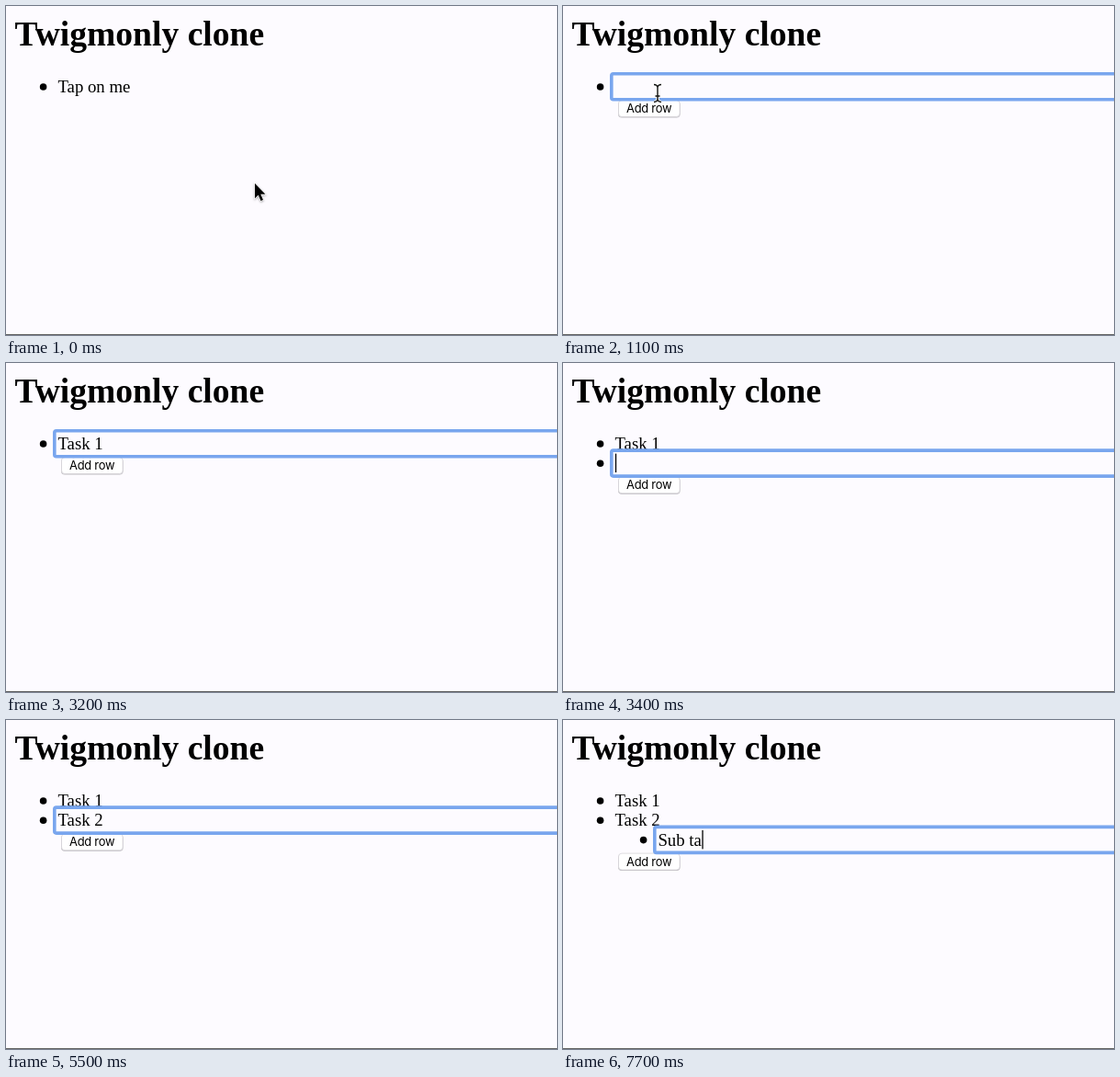
These frames come from a looping animation (600 by 358 pixels, 8000 ms). An HTML page:

```html
<!DOCTYPE html>
<html lang="en">
<head>
<meta charset="utf-8">
<title>Outline editor</title>
<style>
  html, body { margin: 0; width: 100%; height: 100%; overflow: hidden; background: #fdfbff; }
  svg { display: block; width: 600px; height: 358px; }
  text { font: 18.8px "Liberation Serif", "Times New Roman", serif; white-space: pre; }
  .title { font-size: 37.6px; font-weight: bold; }
  .label { font: 12.9px Inter, "Open Sans", sans-serif; letter-spacing: -.02em; text-anchor: middle; }
  .ring { fill: none; stroke: #79a6ee; stroke-width: 3.6; }
  .halo { fill: none; stroke: #fff; stroke-width: 3.4; }
  .beam { fill: none; stroke: #111; stroke-width: 1.4; }
  .arrow { stroke: #fff; stroke-width: 1.3; paint-order: stroke; filter: drop-shadow(0 1px 1px #0005); }
</style>
</head>
<body>
<svg viewBox="0 0 600 358">
  <defs>
    <path id="ibeam" d="M-4 -9.5Q-.5 -9.5 0 -6.5Q.5 -9.5 4 -9.5M0 -7V7M-2.5 3H2.5M-4 9.5Q-.5 9.5 0 6.5Q.5 9.5 4 9.5"/>
  </defs>
  <text class="title" x="9.4" y="42.5">Twigmonly clone</text>
  <g id="rows"></g>
  <g id="button">
    <rect x="60" y="103.4" width="67.6" height="18" rx="4" fill="#bdbbc0"/>
    <rect x="60.5" y="102.5" width="66.6" height="18" rx="3.6" fill="#fff" stroke="#d6d4d8" stroke-width=".8"/>
    <text class="label" x="93.6" y="116">Add row</text>
  </g>
  <rect id="ring" class="ring" x="52.8" y="73.8" width="620" height="28" rx="2"/>
  <rect id="caret" width="1.3" height="20.5"/>
  <g id="pointer">
    <path id="arrow" class="arrow" d="M0 0V16.2L3.7 12.8L6.5 19L9 17.9L6.3 11.8H11.4Z"/>
    <g id="beam"><use href="#ibeam" class="halo"/><use href="#ibeam" class="beam"/></g>
  </g>
  <rect y="357" width="600" height="1" fill="#666"/>
</svg>
<script>
const LOOP = 8000, TICK = 100, PITCH = 21.3, INDENT = 47;
const $ = id => document.getElementById(id);

// time, active row (-1: none), its text, caret shown, indent level
const steps = [
  [0, -1, 'Tap on me', 0, 0],
  [1000, 0, '', 0, 0], [1200, 0, '', 1, 0], [1700, 0, '', 0, 0],
  [1900, 0, 'T', 1, 0], [2100, 0, 'Ta', 1, 0], [2200, 0, 'Tas', 1, 0],
  [2400, 0, 'Task', 1, 0], [2600, 0, 'Task ', 1, 0], [2700, 0, 'Task 1', 1, 0],
  [3200, 0, 'Task 1', 0, 0],
  [3400, 1, '', 1, 0], [3900, 1, '', 0, 0],
  [4100, 1, 'T', 1, 0], [4200, 1, 'Ta', 1, 0], [4300, 1, 'Tas', 1, 0],
  [4400, 1, 'Task', 1, 0], [4500, 1, 'Task ', 1, 0], [5000, 1, 'Task 2', 1, 0],
  [5500, 1, 'Task 2', 0, 0],
  [5700, 2, '', 1, 0], [5900, 2, '', 1, 1],
  [6400, 2, 'S', 1, 1], [6700, 2, 'Su', 1, 1], [6900, 2, 'Sub', 1, 1],
  [7100, 2, 'Sub ', 1, 1], [7500, 2, 'Sub t', 1, 1], [7700, 2, 'Sub ta', 1, 1]
];
const done = ['Task 1', 'Task 2'];
const path = [[0, 271, 193], [700, 103, 83], [900, 103, 95]];
const HIDE = 1900;

const make = (tag, attrs) => {
  const el = document.createElementNS('http://www.w3.org/2000/svg', tag);
  for (const k in attrs) el.setAttribute(k, attrs[k]);
  return $('rows').appendChild(el);
};
const show = (el, on) => { el.style.display = on ? '' : 'none'; };
const move = (el, x, y) => el.setAttribute('transform', `translate(${x} ${y})`);

const rows = [0, 1, 2].map(i => ({
  dot: make('circle', { cx: 40.6, cy: 88 + i * PITCH, r: 3.8 }),
  text: make('text', { x: 56.4, y: 94 + i * PITCH })
}));

function drawRows(t) {
  const [, active, typed, caret, level] = steps.findLast(s => s[0] <= t);
  const last = Math.max(active, 0);
  rows.forEach(({ dot, text }, i) => {
    const on = i <= last, dx = i === last ? level * INDENT : 0;
    show(dot, on);
    show(text, on);
    text.textContent = i < last ? done[i] : typed;
    move(dot, dx, 0);
    move(text, dx, 0);
  });
  const dx = level * INDENT, dy = last * PITCH;
  show($('ring'), active >= 0);
  show($('button'), active >= 0);
  move($('ring'), dx, dy);
  move($('button'), 0, dy);
  show($('caret'), caret);
  if (caret) {
    const width = typed ? rows[last].text.getComputedTextLength() : 0;
    move($('caret'), 56.9 + dx + width, 77.3 + dy);
  }
}

function drawPointer(t) {
  show($('pointer'), t < HIDE);
  const i = Math.max(1, path.findIndex(p => p[0] > t));
  const [a, b] = t < 900 ? [path[i - 1], path[i]] : [path[2], path[2]];
  const u = b[0] > a[0] ? (t - a[0]) / (b[0] - a[0]) : 0;
  const e = u * u * (3 - 2 * u);
  const y = a[2] + (b[2] - a[2]) * e;
  move($('pointer'), a[1] + (b[1] - a[1]) * e, y);
  show($('arrow'), y > 99);
  show($('beam'), y <= 99);
}

const start = performance.now();
let shown = -1;
function frame() {
  const t = Math.floor((performance.now() - start) % LOOP / TICK) * TICK;
  if (t !== shown) {
    drawRows(t);
    drawPointer(t);
    shown = t;
  }
  requestAnimationFrame(frame);
}
frame();
</script>
</body>
</html>
```
